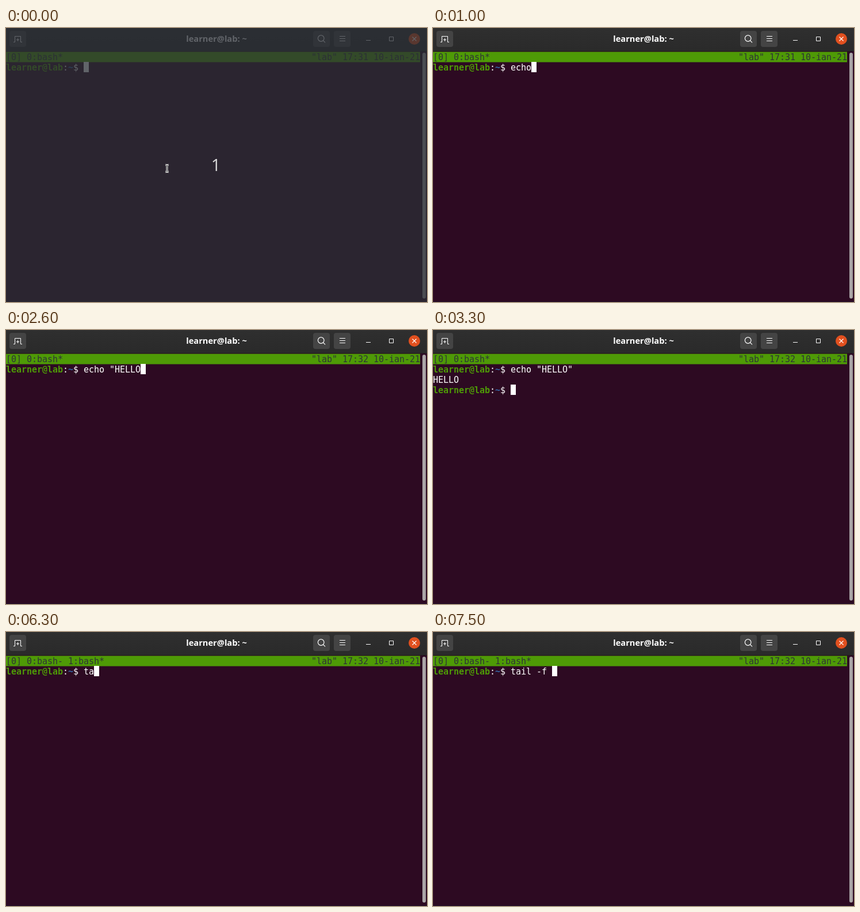
These frames come from a looping animation (732x477 px, 8000 ms). An HTML page with a canvas:

```html
<!DOCTYPE html>
<html lang="en">
<head>
<meta charset="utf-8">
<title>Terminal</title>
<style>
  html, body { margin: 0; width: 100%; height: 100%; overflow: hidden; background: #2d0a22; }
  canvas { display: block; width: 732px; height: 477px; }
</style>
</head>
<body>
<canvas id="stage" width="732" height="477"></canvas>
<script>
const ctx = document.getElementById('stage').getContext('2d');
const W = 732, H = 477, LOOP = 8000;
const CELL_W = 9, CELL_H = 18, TOP = 41, BASELINE = 15;
const MONO = '15px "DejaVu Sans Mono", monospace';
const SANS = '"Open Sans", "Noto Sans", sans-serif';
const GREEN = '#4e9a06', BLUE = '#3465a4', WHITE = '#fff', DARK = '#2e3436', PURPLE = '#2d0a22';
const USER = 'learner', HOST = 'lab';
const LOGIN = `${USER}@${HOST}`;

const ECHO = 'echo "HELLO"', TAIL = 'tail -f ';
// [time in ms, characters typed so far]
const ECHO_KEYS = [[800, 2], [900, 3], [1000, 4], [1300, 5], [1500, 6], [2000, 8],
                   [2300, 9], [2500, 10], [2600, 11], [3200, 12]];
const TAIL_KEYS = [[6300, 2], [6400, 3], [6500, 4], [6800, 5], [7000, 6], [7300, 7], [7500, 8]];
const COUNTDOWN_END = 200, POINTER_END = 800, CLOCK_TICK = 1500, ENTER = 3300, NEW_WINDOW = 4400;

function typed(text, keys, t) {
  let count = 0;
  for (const [time, n] of keys) if (t >= time) count = n;
  return text.slice(0, count);
}

function rect(x, y, w, h, color) {
  ctx.fillStyle = color;
  ctx.fillRect(x, y, w, h);
}

function roundRect(x, y, w, h, r, color) {
  ctx.beginPath();
  ctx.roundRect(x, y, w, h, r);
  ctx.fillStyle = color;
  ctx.fill();
}

function strokePath(d, color = WHITE, width = 1) {
  ctx.strokeStyle = color;
  ctx.lineWidth = width;
  ctx.stroke(new Path2D(d));
}

function print(text, col, row, color, bold) {
  ctx.font = (bold ? 'bold ' : '') + MONO;
  ctx.textAlign = 'left';
  ctx.fillStyle = color;
  [...text].forEach((ch, i) => ctx.fillText(ch, (col + i) * CELL_W, TOP + row * CELL_H + BASELINE));
}

function prompt(row, command, active) {
  const end = LOGIN.length;
  const commandCol = end + 4;
  print(LOGIN, 0, row, GREEN, true);
  print(':', end, row, WHITE);
  print('~', end + 1, row, BLUE, true);
  print('$', end + 2, row, WHITE);
  print(command, commandCol, row, WHITE);
  if (active) {
    rect((commandCol + command.length) * CELL_W, TOP + row * CELL_H, CELL_W, CELL_H, WHITE);
  }
}

function titleBar() {
  const shade = ctx.createLinearGradient(0, 0, 0, 40);
  shade.addColorStop(0, '#2f2f2f');
  shade.addColorStop(1, '#2a2a2a');
  rect(0, 0, W, 40, shade);
  rect(0, 40, W, 1, '#241a20');

  for (const x of [6, 534, 570]) roundRect(x, 5, 29, 28, 4, '#444');
  strokePath('M13 24.5H15.5V14.5H25.5V24.5H28M20.5 18V23M18 20.5H23');
  strokePath('M553 18a5.3 5.3 0 1 1-10.6 0a5.3 5.3 0 1 1 10.6 0M551.5 21.8L555 25.3', WHITE, 1.2);
  strokePath('M580 14.5H590M580 18.5H590M580 22.5H590');
  strokePath('M626 21.5H634M666.5 15.5H673.5V22.5H666.5Z');

  ctx.beginPath();
  ctx.arc(710, 19, 10, 0, Math.PI * 2);
  ctx.fillStyle = '#e1501f';
  ctx.fill();
  strokePath('M706.5 15.5L713.5 22.5M713.5 15.5L706.5 22.5', WHITE, 1.2);

  ctx.font = 'bold 14.67px ' + SANS;
  ctx.textAlign = 'center';
  ctx.fillStyle = WHITE;
  ctx.fillText(`${LOGIN}: ~`, 366, 24);
}

function terminal(t) {
  const second = t >= NEW_WINDOW;
  rect(0, TOP + .5, 80 * CELL_W, CELL_H, GREEN);
  print(second ? '[0] 0:bash- 1:bash*' : '[0] 0:bash*', 0, 0, DARK);
  const status = `"${HOST}" 17:${t < CLOCK_TICK ? 31 : 32} 10-ian-21`;
  print(status, 80 - status.length, 0, DARK);

  if (second) {
    prompt(1, typed(TAIL, TAIL_KEYS, t), true);
  } else {
    const done = t >= ENTER;
    prompt(1, typed(ECHO, ECHO_KEYS, t), !done);
    if (done) {
      print('HELLO', 0, 2, WHITE);
      prompt(3, '', true);
    }
  }
  roundRect(724, 43, 6, 428, 3, '#aaa5a7');
  rect(0, H - 1, W, 1, '#211029');
}

function countdown() {
  rect(0, 0, W, H, 'rgba(42, 46, 53, .74)');
  ctx.font = '29px ' + SANS;
  ctx.textAlign = 'center';
  ctx.fillStyle = '#dcdcdc';
  ctx.fillText('1', 365, 249);
}

function pointer() {
  const beam = 'M277 238.5H279L280 239.5L281 238.5H283M280 239.5V249.5M277 250.5H279L280 249.5L281 250.5H283';
  strokePath(beam, WHITE, 3);
  strokePath(beam, '#111', 1);
}

function draw(t) {
  rect(0, 0, W, H, PURPLE);
  titleBar();
  terminal(t);
  if (t < COUNTDOWN_END) countdown();
  if (t < POINTER_END) pointer();
}

const start = performance.now();
function tick() {
  draw((performance.now() - start) % LOOP);
  requestAnimationFrame(tick);
}
tick();
</script>
</body>
</html>
```
